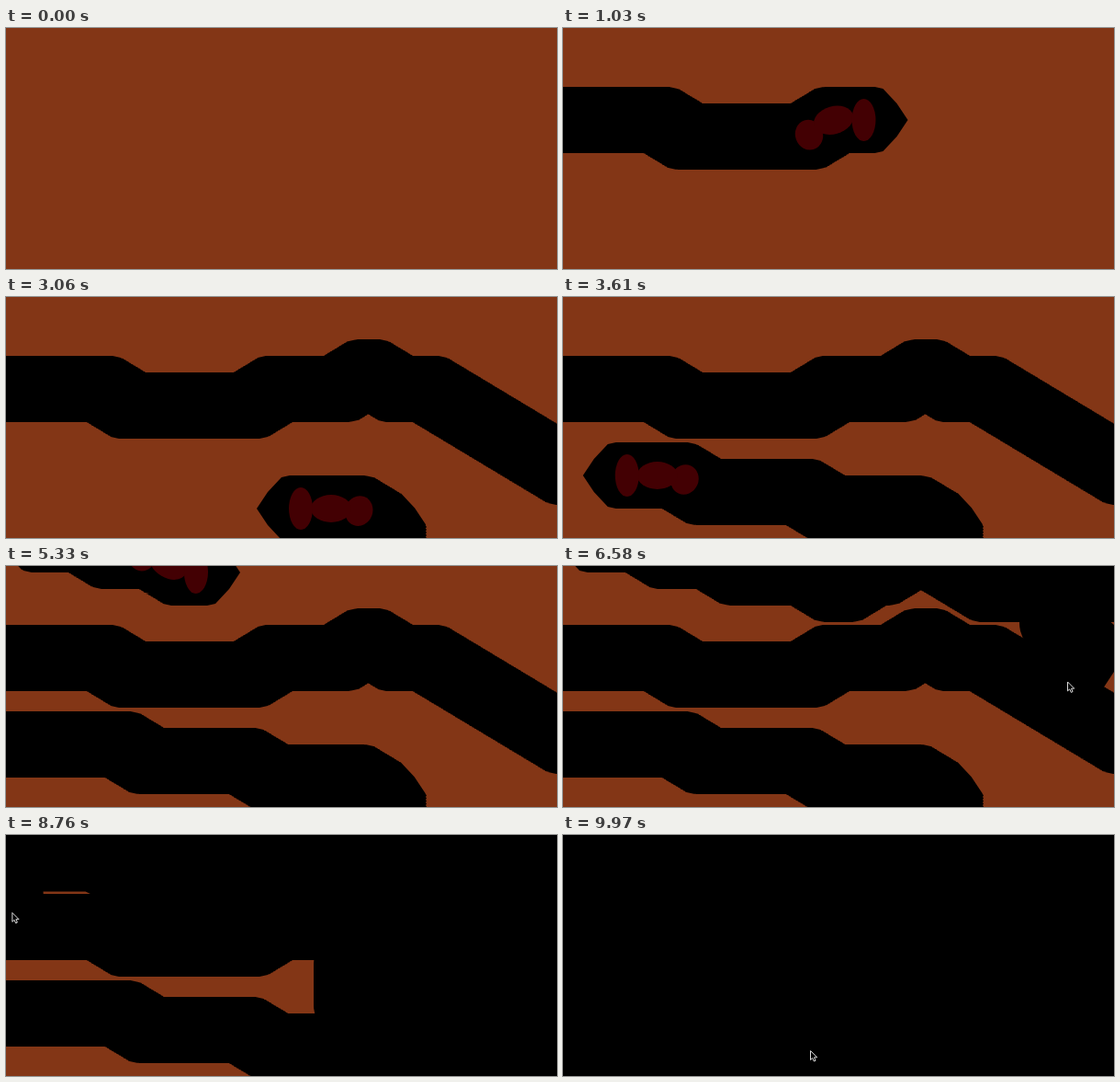
Animation of 600 by 262 pixels, one loop 10000 ms. Source, as an HTML page with a canvas:

```html
<!DOCTYPE html>
<html lang="en">
<head>
<meta charset="utf-8">
<title>Digging worm</title>
<style>
  html, body { margin: 0; width: 100%; height: 100%; overflow: hidden; background: #833616; }
  canvas { display: block; width: 100%; height: 100%; }
</style>
</head>
<body>
<canvas id="stage" width="600" height="262"></canvas>
<script>
const ctx = document.getElementById('stage').getContext('2d');
const LOOP = 10000, SPEED = 0.475, STEP = 18, STEP_RUN = 30;
const EARTH = '#833616', WORM = '#430003';

// A level route that shifts one step down at each x, or up where x is negative.
function steps(x, y, dir, turns) {
  const route = [[x, y]];
  for (const turn of turns) {
    const at = Math.abs(turn);
    route.push([at, y]);
    y += Math.sign(turn) * STEP;
    route.push([at + dir * STEP_RUN, y]);
  }
  return [...route, [x + dir * 1000, y]];
}

const runs = [
  { start: 270, end: 1910,
    route: steps(-24, 100, 1, [105, -265, -363, 396, 460, 490, 520, 550, 580]) },
  { start: 2760, end: 3940,
    route: [[410, 297], ...steps(410, 248, -1, [-410, -290, -155])] },
  { start: 4910, end: 6390,
    route: [[38, -50], ...steps(38, -29, 1, [85, 162, 265, -305, -345, 405, 435])] }
];

// Pointer strokes, each at an even pace.
const wipes = [
  { start: 6390, end: 6580, route: [[590, 20], [533, 62], [574, 89], [549, 127]] },
  { start: 6580, end: 7970,
    route: [[549, 127], [590, 80], [585, 150], [432, 165], [482, 243], [592, 236], [510, 210],
            [440, 178], [371, 185], [371, 140], [530, 85], [460, 60], [346, 60]] },
  { start: 7970, end: 8760,
    route: [[346, 60], [220, 62], [150, 52], [95, 25.5], [2, 25.5], [6, 85]] },
  { start: 8760, end: 9970,
    route: [[6, 85], [75, 75], [20, 150], [327, 165], [310, 180], [220, 235], [15, 245], [269.5, 235]] }
];

const corner = [[48, 0], [36, 18], [21, 34], [12, 36]];
const half = [...corner, ...corner.map(([x, y]) => [-x, y]).reverse()];
const bite = [...half, ...half.map(([x, y]) => [-x, -y])];
const arrow = [[0, 0], [0, 9.5], [2.2, 7.5], [3.8, 11], [5.5, 10.2], [4, 6.8], [6.8, 6.8]];

function polygon(points, x, y) {
  points.forEach(([px, py], i) => i ? ctx.lineTo(x + px, y + py) : ctx.moveTo(x + px, y + py));
  ctx.closePath();
}

function routeLength(route) {
  let sum = 0;
  for (let i = 1; i < route.length; i++) {
    sum += Math.hypot(route[i][0] - route[i - 1][0], route[i][1] - route[i - 1][1]);
  }
  return sum;
}

// Point at a distance along a route; the ends are extended straight.
function along(route, dist) {
  for (let i = 1; ; i++) {
    const [x, y] = route[i - 1], [x2, y2] = route[i];
    const len = Math.hypot(x2 - x, y2 - y);
    if (dist < len || i === route.length - 1) {
      const k = dist / len;
      return [x + (x2 - x) * k, y + (y2 - y) * k];
    }
    dist -= len;
  }
}

function drawRun({ start, end, route }, t) {
  if (t < start) return;
  const head = (Math.min(t, end) - start) * SPEED;
  ctx.fillStyle = '#000';
  ctx.beginPath();
  for (let d = head; d > 0; d -= 3) polygon(bite, ...along(route, d));
  polygon(bite, ...route[0]);
  ctx.fill();
  if (t >= end) return;

  ctx.fillStyle = WORM;
  for (const [back, rx, ry] of [[64, 15, 16.5], [33, 22, 15], [0, 13, 23]]) {
    const d = head - back;
    const [x, y] = along(route, d);
    const [ax, ay] = along(route, d - 16), [bx, by] = along(route, d + 16);
    ctx.beginPath();
    ctx.ellipse(x, y, rx, ry, Math.atan2(by - ay, bx - ax), 0, 7);
    ctx.fill();
  }
}

// Strokes the wipe as far as it has come and returns the pointer position.
function drawWipe({ start, end, route }, t) {
  const length = routeLength(route);
  const done = length * Math.min(1, (t - start) / (end - start));
  ctx.strokeStyle = '#000';
  ctx.lineWidth = 72;
  ctx.lineCap = ctx.lineJoin = 'round';
  ctx.setLineDash([done, 2 * length]);
  ctx.beginPath();
  for (const [x, y] of route) ctx.lineTo(x, y);
  ctx.stroke();
  ctx.setLineDash([]);
  return along(route, done);
}

function drawPointer(x, y) {
  ctx.beginPath();
  polygon(arrow, x, y);
  ctx.fillStyle = '#000';
  ctx.fill();
  ctx.strokeStyle = '#ddd';
  ctx.lineWidth = 1;
  ctx.lineJoin = 'miter';
  ctx.stroke();
}

function draw() {
  const t = performance.now() % LOOP;
  ctx.fillStyle = EARTH;
  ctx.fillRect(0, 0, 600, 262);
  for (const run of runs) drawRun(run, t);
  let tip;
  for (const wipe of wipes) if (t >= wipe.start) tip = drawWipe(wipe, t);
  if (tip) drawPointer(...tip);
  requestAnimationFrame(draw);
}
draw();
</script>
</body>
</html>
```
